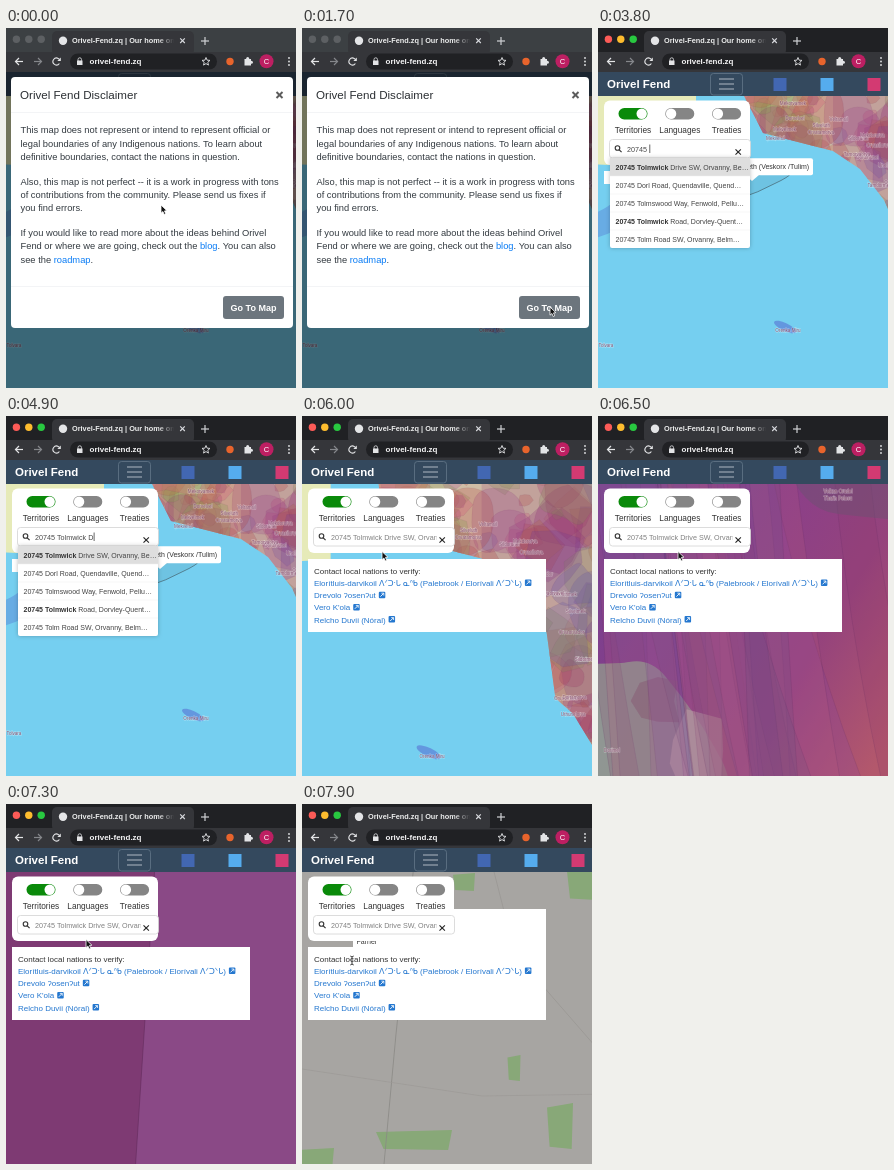
These frames come from a looping animation (290x360 px, 8000 ms). An HTML page with a canvas:

```html
<!DOCTYPE html>
<html lang="en">
<head>
<meta charset="utf-8">
<title>Territory map</title>
<style>
html, body { margin: 0; width: 100%; height: 100%; overflow: hidden; background: #75cff0; }
canvas { display: block; width: 290px; height: 360px; }
</style>
</head>
<body>
<canvas id="stage"></canvas>
<script>
const W = 290, H = 360, LOOP = 8000, STEP = 100;
const canvas = document.getElementById('stage');
const ctx = canvas.getContext('2d');
const dpr = window.devicePixelRatio || 1;
canvas.width = W * dpr;
canvas.height = H * dpr;

const FONT = '"Liberation Sans", "DejaVu Sans", sans-serif';
const WATER = '#75cff0', LINK = '#2477cf', ICON = '#e3e4e6';
const ADDRESS = '20745 Tolmwick Drive SW, Orvanny, Belmora';
const clamp = v => Math.max(0, Math.min(1, v));
const mix = (a, b, k) => a + (b - a) * k;

// Interpolates rows of [time, ...values]
function track(rows, t) {
  const i = rows.findIndex(row => t <= row[0]);
  if (i === 0) return rows[0].slice(1);
  if (i < 0) return rows[rows.length - 1].slice(1);
  const [t0, ...a] = rows[i - 1], [t1, ...b] = rows[i];
  return a.map((v, j) => mix(v, b[j], (t - t0) / (t1 - t0)));
}

function random(seed) {
  return () => {
    seed = (seed + 0x6d2b79f5) | 0;
    let r = Math.imul(seed ^ (seed >>> 15), 1 | seed);
    r = (r + Math.imul(r ^ (r >>> 7), 61 | r)) ^ r;
    return ((r ^ (r >>> 14)) >>> 0) / 4294967296;
  };
}

function rect(x, y, w, h, color) {
  ctx.fillStyle = color;
  ctx.fillRect(x, y, w, h);
}

function box(x, y, w, h, r, color, edge) {
  ctx.beginPath();
  ctx.roundRect(x, y, w, h, r);
  if (color) { ctx.fillStyle = color; ctx.fill(); }
  if (edge) { ctx.strokeStyle = edge; ctx.lineWidth = 0.8; ctx.stroke(); }
}

function disc(x, y, r, color) {
  ctx.beginPath();
  ctx.arc(x, y, r, 0, 7);
  ctx.fillStyle = color;
  ctx.fill();
}

function ring(x, y, r, color, from = 0, to = 7) {
  ctx.beginPath();
  ctx.arc(x, y, r, from, to);
  ctx.strokeStyle = color;
  ctx.lineWidth = 1.1;
  ctx.stroke();
}

function line(pts, color, width = 1) {
  ctx.beginPath();
  for (let i = 0; i < pts.length; i += 2) ctx.lineTo(pts[i], pts[i + 1]);
  ctx.strokeStyle = color;
  ctx.lineWidth = width;
  ctx.stroke();
}

function cross(x, y, r, color, width) {
  line([x - r, y - r, x + r, y + r], color, width);
  line([x - r, y + r, x + r, y - r], color, width);
}

// Closed path through [x, y] points, or rounded between them
function area(pts, soft) {
  const p = new Path2D(), n = pts.length;
  const mid = i => [0, 1].map(j => (pts[i % n][j] + pts[(i + 1) % n][j]) / 2);
  if (soft) p.moveTo(...mid(n - 1));
  pts.forEach((q, i) => soft ? p.quadraticCurveTo(...q, ...mid(i)) : p.lineTo(...q));
  p.closePath();
  return p;
}

function blob(x, y, r, rnd) {
  const n = 6 + Math.floor(rnd() * 4);
  return area(Array.from({ length: n }, (_, i) => {
    const a = i / n * Math.PI * 2, d = r * (0.6 + rnd() * 0.6);
    return [x + Math.cos(a) * d, y + Math.sin(a) * d];
  }), rnd() < 0.3);
}

function fill(path, color, edge, width = 0.6) {
  ctx.fillStyle = color;
  ctx.fill(path);
  if (edge) { ctx.strokeStyle = edge; ctx.lineWidth = width; ctx.stroke(path); }
}

function text(str, x, y, size, color, weight = 'normal', align = 'left') {
  ctx.font = `${weight} ${size}px ${FONT}`;
  ctx.textAlign = align;
  ctx.fillStyle = color;
  ctx.fillText(str, x, y);
  return x + ctx.measureText(str).width;
}

function label(str, x, y) {
  ctx.font = `4.6px ${FONT}`;
  ctx.textAlign = 'center';
  ctx.strokeStyle = 'rgba(255,255,255,.4)';
  ctx.lineWidth = 1;
  ctx.strokeText(str, x, y);
  text(str, x, y, 4.6, '#87506f', 'normal', 'center');
}

// ---- Map ----
const coast = [
  [142, 60], [165, 105], [200, 114], [235, 123], [262, 141], [286, 172],
  [294, 190], [302, 250], [318, 264], [340, 300], [365, 350]
];
const land = area([[130, -60], ...coast, [520, 350], [520, -60]]);
const peninsula = area([[-10, 40], [98, 40], [98, 124], [58, 126], [56, 148], [36, 172], [30, 168], [34, 138], [-10, 136]]);
const arc = area([[76, 164], [98, 151], [150, 149], [206, 140], [160, 165], [112, 180]], true);
const tints = ['#b8463c', '#8e2a7a', '#6a3fa0', '#d2547a', '#b9713a', '#7fa052', '#a03060', '#5a5cae', '#c98a5f', '#a04a90'];
const pick = (list, rnd) => list[Math.floor(rnd() * list.length)];

const rnd = random(41);
const territories = Array.from({ length: 340 }, () => ({
  path: blob(mix(140, 470, rnd()), mix(0, 330, rnd()), 5 + 34 * rnd() ** 2, rnd),
  tint: pick(tints, rnd)
}));
const syllables = ['vel', 'dor', 'mek', 'uth', 'sil', 'orva', 'tam', 'unel'];
const invent = () => {
  const name = pick(syllables, rnd) + pick(syllables, rnd) + pick(syllables, rnd);
  return name[0].toUpperCase() + name.slice(1);
};
const places = Array.from({ length: 34 }, (_, i) => {
  const [x, y] = coast[i % coast.length];
  return [x + mix(-6, 30, rnd()), y - mix(-8, 34, rnd()), invent()];
});
places.push([190, 304, 'Orenka Miru'], [8, 319, 'Tolvara']);

function continent(cx, cy, s) {
  ctx.save();
  ctx.translate(145, 214);
  ctx.scale(s, s);
  ctx.translate(-cx, -cy);
  fill(peninsula, '#e6eab8');
  ctx.beginPath();
  ctx.moveTo(-12, 200);
  ctx.quadraticCurveTo(25, 192, 38, 163);
  ctx.strokeStyle = 'rgba(80,110,205,.36)';
  ctx.lineWidth = 24;
  ctx.stroke();
  ctx.beginPath();
  ctx.ellipse(187, 299, 12, 4, 0.45, 0, 7);
  ctx.fillStyle = 'rgba(82,96,205,.5)';
  ctx.fill();
  fill(arc, 'rgba(100,175,205,.4)', '#45636f', 0.7 / s);
  ctx.clip(land);
  rect(100, -60, 420, 420, '#cfbda6');
  ctx.globalAlpha = 0.25;
  for (const z of territories) fill(z.path, z.tint, '#6d3f64', 0.35 / s);
  ctx.globalAlpha = 0.2;
  rect(235, -60, 300, 420, '#8a3a70');
  ctx.restore();
  if (s < 3) for (const [x, y, name] of places) label(name, (x - cx) * s + 145, (y - cy) * s + 214);
}

// Draws a close-up laid out for one zoom level
function closeUp(zoom, level, alpha, draw) {
  if (alpha <= 0) return;
  const s = 2 ** (zoom - level);
  ctx.save();
  ctx.globalAlpha = alpha;
  ctx.translate(145, 214);
  ctx.scale(s, s);
  ctx.translate(-145, -214);
  draw();
  ctx.restore();
}

function region() {
  const rnd = random(12);
  const blend = ctx.createLinearGradient(0, 150, 290, 330);
  ['#74439a', '#8a3f8a', '#95437c', '#b3586c'].forEach((c, i) => blend.addColorStop(i / 3, c));
  rect(-900, -900, 2100, 2100, blend);
  const pale = area([[-300, 240], [10, 250], [52, 242], [82, 278], [108, 315], [140, 375], [150, 640], [-300, 640]], true);
  fill(pale, 'rgba(146,160,148,.9)');
  fill(blob(98, 335, 42, rnd), 'rgba(198,194,182,.7)');
  fill(blob(60, 285, 26, rnd), 'rgba(128,88,110,.5)');
  for (let i = 0; i < 20; i++) {
    const x = mix(-60, 320, rnd()), w = mix(20, 100, rnd());
    const bend = mix(-10, 70, rnd()), drift = mix(20, 210, rnd());
    const band = new Path2D();
    band.moveTo(x, -200);
    band.quadraticCurveTo(x + bend, 190, x + drift, 640);
    band.lineTo(x + drift + w * 1.6, 640);
    band.quadraticCurveTo(x + bend + w, 190, x + w, -200);
    const tint = pick(['#7a3fb0', '#b04a98', '#8a3468', '#c0607c', '#64507e'], rnd);
    fill(band, tint + '2c', '#5a286040');
  }
  fill(area([[170, -80], [420, -80], [420, 110], [290, 104], [190, 92]], true), 'rgba(105,82,112,.45)');
  label('Velkan Orudel', 240, 77);
  label('Tharin Pelosu', 240, 84);
  label('Dorimel', 14, 336);
}

function district() {
  const edge = y => 153 - y * 0.065;
  rect(-900, -900, 2100, 2100, '#8a4986');
  fill(area([[-900, -900], [edge(-900), -900], [edge(1200), 1200], [-900, 1200]]), '#7e3a73', 'rgba(92,38,86,.6)', 0.8);
}

function streets() {
  rect(-900, -900, 2100, 2100, '#a7a5a2');
  const parks = [[112, 336, 76, 20], [258, 322, 26, 46], [212, 264, 13, 26], [280, 80, 30, 32], [10, 356, 44, 24], [162, 78, 22, 18]];
  for (const [x, y, w, h] of parks) {
    const a = w / 2, b = h / 2;
    fill(area([[x - a, y - b * 0.8], [x + a, y - b], [x + a * 0.9, y + b], [x - a * 0.8, y + b * 0.9]]), '#88a878');
  }
  line([112, 60, 94, 230, 82, 360, 78, 460], '#8b8986', 0.8);
  line([190, 60, 213, 150, 300, 250], '#989693', 0.7);
  line([-20, 262, 180, 292, 310, 290], '#9c9a97', 0.7);
}

function map(t) {
  rect(0, 44, W, 316, WATER);
  const [cx, cy, zoom] = track([
    [5600, 145, 214, 0], [6000, 203.6, 188, 0.14], [6300, 312, 191, 2],
    [6500, 330, 192, 4.3], [7300, 330, 192, 7.5], [7900, 330, 192, 9]
  ], t);
  const near = clamp((zoom - 3) / 1.2), close = clamp((zoom - 5.5) / 1.5);
  if (near < 1) continent(cx, cy, 2 ** zoom);
  if (close < 1) closeUp(zoom, 4.3, near, region);
  if (t > 7300) closeUp(zoom, 9, 1, streets);
  closeUp(zoom, 7.5, close * clamp((7800 - t) / 400), district);
}

// ---- Page ----
function nav() {
  rect(0, 44, W, 24, '#34495e');
  text('Orivel Fend', 9, 60, 11.5, '#fff', 'bold');
  box(112.5, 45.5, 32, 21.5, 3, null, '#64768a');
  for (let i = 0; i < 3; i++) line([121, 51 + i * 5, 136, 51 + i * 5], '#9ba7b3', 1.2);
  ['#4267b2', '#55acee', '#d33a72'].forEach((c, i) => rect(175.5 + i * 47, 50, 13, 13, c));
}

function toggle(x, name, on) {
  box(x - 14.5, 80, 29, 11.5, 5.75, on ? '#0a8a0a' : '#858585');
  disc(x + (on ? 8.7 : -8.7), 85.8, 5.2, '#fff');
  text(name, x, 105, 8.3, '#333', 'normal', 'center');
}

function searchBox(t) {
  const typed = Math.floor(clamp((t - 3100) / 2250) * 20);
  const chosen = t >= 5500;
  box(6, 72.5, 146, 64.5, 6, '#fff');
  ['Territories', 'Languages', 'Treaties'].forEach((name, i) => toggle(35 + i * 46.8, name, i === 0));
  box(11.5, 111.5, 141, 18.5, 3, '#fff', '#d4d4d4');
  ring(19.5, 120, 2.3, '#333');
  line([21.2, 121.8, 23.6, 124.2], '#333', 1.2);

  ctx.save();
  ctx.beginPath();
  ctx.rect(28, 112, 106.5, 18);
  ctx.clip();
  if (chosen) text(ADDRESS, 29, 123.5, 7.2, '#808080');
  else if (typed) {
    const end = text(ADDRESS.slice(0, typed), 29, 123.5, 7.2, '#484848');
    line([end + 0.8, 116.5, end + 0.8, 125], '#222', 0.7);
  } else text('Search', 29, 123.5, 7, '#707070');
  ctx.restore();
  if (typed || chosen) cross(140.2, 124, 2.7, '#222', 1.1);
  if (typed > 3 && !chosen) suggestions();
}

function suggestions() {
  const rows = [
    ['20745 Tolmwick', ' Drive SW, Orvanny, Be…'],
    ['', '20745 Dorl Road, Quendaville, Quend…'],
    ['', '20745 Tolmswood Way, Fenwold, Pellu…'],
    ['20745 Tolmwick', ' Road, Dorvley-Quent…'],
    ['', '20745 Tolm Road SW, Orvanny, Belm…']
  ];
  ctx.save();
  ctx.shadowColor = 'rgba(0,0,0,.25)';
  ctx.shadowBlur = 4 * dpr;
  box(12, 130, 140, 90, 2, '#fff');
  ctx.restore();
  rect(12, 130, 140, 18, '#dedede');
  rows.forEach(([strong, rest], i) => {
    const y = 141.5 + i * 18;
    if (i) line([12, y - 11.5, 152, y - 11.5], '#ececec', 0.5);
    text(rest, text(strong, 17.5, y, 7, '#333', 'bold'), y, 7, '#444');
  });
}

function results() {
  rect(6, 143, 238, 73, '#fff');
  text('Contact local nations to verify:', 12, 158, 8, '#333');
  [
    'Elorítluis-darvikoil ᐱᐟᑐᐧᒐ ᓇᐢᑲ (Palebrook / Elorívali ᐱᐟᑐᐠᒐ)',
    'Drevolo ʔosenʔut', "Vero K'ola", 'Relcho Duvii (Nóral)'
  ].forEach((name, i) => {
    const y = 170 + i * 12.2, x = text(name, 12, y, 8, LINK) + 3;
    box(x, y - 6.5, 6.5, 6.5, 1, LINK);
    line([x + 1.6, y - 1.6, x + 4.8, y - 4.8], '#fff', 0.9);
    line([x + 2.6, y - 5, x + 5, y - 5, x + 5, y - 2.6], '#fff', 0.8);
  });
}

function tooltips(t) {
  if (t >= 2600 && t < 5500) {
    box(94, 130.3, 121, 17, 2, '#fff');
    fill(area([[147, 147], [161, 147], [154, 153]]), '#fff');
    text('Veskoren Dolameth (Veskorx /Tulim)', 154.5, 141, 7, '#333', 'normal', 'center');
  }
  if (t >= 7700) {
    rect(51, 105, 193, 39, '#fff');
    text('Farnel', 54.5, 140, 7, '#333');
  }
}

// Text between asterisks is shown as a link
const paragraphs = [
  ['This map does not represent or intend to represent official or',
    'legal boundaries of any Indigenous nations. To learn about',
    'definitive boundaries, contact the nations in question.'],
  ['Also, this map is not perfect -- it is a work in progress with tons',
    'of contributions from the community. Please send us fixes if',
    'you find errors.'],
  ['If you would like to read more about the ideas behind Orivel',
    'Fend or where we are going, check out the *blog*. You can also',
    'see the *roadmap*.']
];

function modal(t) {
  const k = clamp((2300 - t) / 300);
  if (!k) return;
  ctx.save();
  ctx.globalAlpha = k;
  rect(0, 44, W, 316, 'rgba(0,0,0,.5)');
  ctx.translate(0, -25 * (1 - k));
  box(5, 49, 282, 251, 4, '#fff');
  text('Orivel Fend Disclaimer', 14, 71, 11.6, '#2b2f33');
  cross(273.5, 67, 3, '#5c5c5c', 1.9);
  for (const y of [84.5, 258.5]) line([5, y, 287, y], '#eef0f2', 0.7);
  paragraphs.forEach((rows, p) => rows.forEach((row, i) => {
    let x = 14.5;
    row.split('*').forEach((part, j) => {
      x = text(part, x, 105.3 + p * 51.4 + i * 13.3, 9.33, j % 2 ? '#087bf5' : '#333a40');
    });
  }));
  box(217, 268, 61, 23, 3, t >= 1800 ? '#5a6268' : '#6c757d');
  text('Go To Map', 247.5, 282.8, 9, '#fff', 'bold', 'center');
  ctx.restore();
}

// ---- Browser frame ----
function arrow(x, dir, color) {
  line([x - dir * 4, 33.5, x + dir * 3.5, 33.5], color, 1.2);
  line([x, 30, x + dir * 3.5, 33.5, x, 37], color, 1.2);
}

function browser(t) {
  const active = t >= 1800;
  rect(0, 0, W, 24, active ? '#202124' : '#3c4043');
  ['#fc5b57', '#fdbc2e', '#28c840'].forEach((c, i) => disc(10.4 + i * 12.4, 11.2, 3.7, active ? c : '#5d6063'));
  box(46, 3, 142, 24, 5, '#35363a');
  rect(0, 24, W, 20, '#35363a');
  disc(57, 12.7, 4.2, '#e4e5e7');
  text('Orivel-Fend.zq | Our home on', 66, 15.3, 7.35, '#eceded', 'bold');
  const fade = ctx.createLinearGradient(152, 0, 168, 0);
  fade.addColorStop(0, 'rgba(53,54,58,0)');
  fade.addColorStop(1, '#35363a');
  rect(152, 5, 20, 17, fade);
  cross(176.5, 12.7, 2.3, '#dadce0', 1.1);
  line([195, 13, 203, 13], '#cfd1d4', 1.2);
  line([199, 9, 199, 17], '#cfd1d4', 1.2);

  arrow(13, -1, ICON);
  arrow(32, 1, '#85878b');
  ring(50.5, 33.5, 3.5, ICON, 0.6, 5.6);
  fill(area([[54.8, 29.5], [54.8, 33], [51.3, 33]]), ICON);

  box(64, 25.5, 147, 16, 8, '#202124');
  rect(71, 32.5, 5.5, 4.5, ICON);
  box(72, 29.8, 3.5, 4, 1.7, null, ICON);
  text('orivel-fend.zq', 83.5, 36.3, 8, '#f4f4f5', 'bold');
  const star = Array.from({ length: 10 }, (_, i) => {
    const a = -Math.PI / 2 + i * Math.PI / 5, r = i % 2 ? 1.9 : 4.2;
    return [200 + r * Math.cos(a), 33.7 + r * Math.sin(a)];
  });
  ctx.strokeStyle = ICON;
  ctx.lineWidth = 0.9;
  ctx.stroke(area(star));
  disc(224, 33.5, 3.7, '#e8642c');
  rect(238.5, 31, 6.5, 6.5, ICON);
  disc(241.7, 30.6, 1.5, ICON);
  disc(245.4, 34.2, 1.5, ICON);
  disc(260.5, 33.3, 7, '#bd1f62');
  text('C', 260.5, 36, 7.6, '#fff', 'normal', 'center');
  for (let i = -1; i < 2; i++) disc(283, 33.5 + i * 3.5, 0.9, ICON);
}

function pointer(t) {
  if (t >= 3000 && t < 5200) return;
  const [x, y] = track([
    [100, 155, 177], [600, 172, 168], [900, 172, 168], [1700, 248, 279], [2400, 248, 279],
    [2600, 154, 153], [2700, 97, 120], [5100, 97, 120], [5400, 80, 135.5], [7400, 80, 135.5], [7800, 50, 156.5]
  ], t);
  if ((t >= 2700 && t < 3000) || t >= 7800) {
    line([x, y - 3.7, x, y + 3.7], '#222', 0.9);
    for (const d of [-1, 1]) line([x - 1.8, y + d * 4.5, x, y + d * 3.7, x + 1.8, y + d * 4.5], '#222', 0.8);
    return;
  }
  const tip = [[0, 0], [0, 8.2], [1.9, 6.5], [3.2, 9.5], [4.7, 8.8], [3.5, 5.9], [5.9, 5.7]];
  fill(area(tip.map(([dx, dy]) => [x + dx, y + dy])), '#111', '#fff', 0.8);
}

function render(t) {
  ctx.setTransform(dpr, 0, 0, dpr, 0, 0);
  ctx.save();
  ctx.beginPath();
  ctx.rect(0, 44, W, H - 44);
  ctx.clip();
  map(t);
  nav();
  if (t >= 5900) results();
  else rect(6, 143, 12, 13, '#fff');
  tooltips(t);
  searchBox(t);
  modal(t);
  ctx.restore();
  browser(t);
  pointer(t);
}

function frame() {
  render(Math.floor(performance.now() % LOOP / STEP) * STEP);
  requestAnimationFrame(frame);
}
frame();
</script>
</body>
</html>
```
